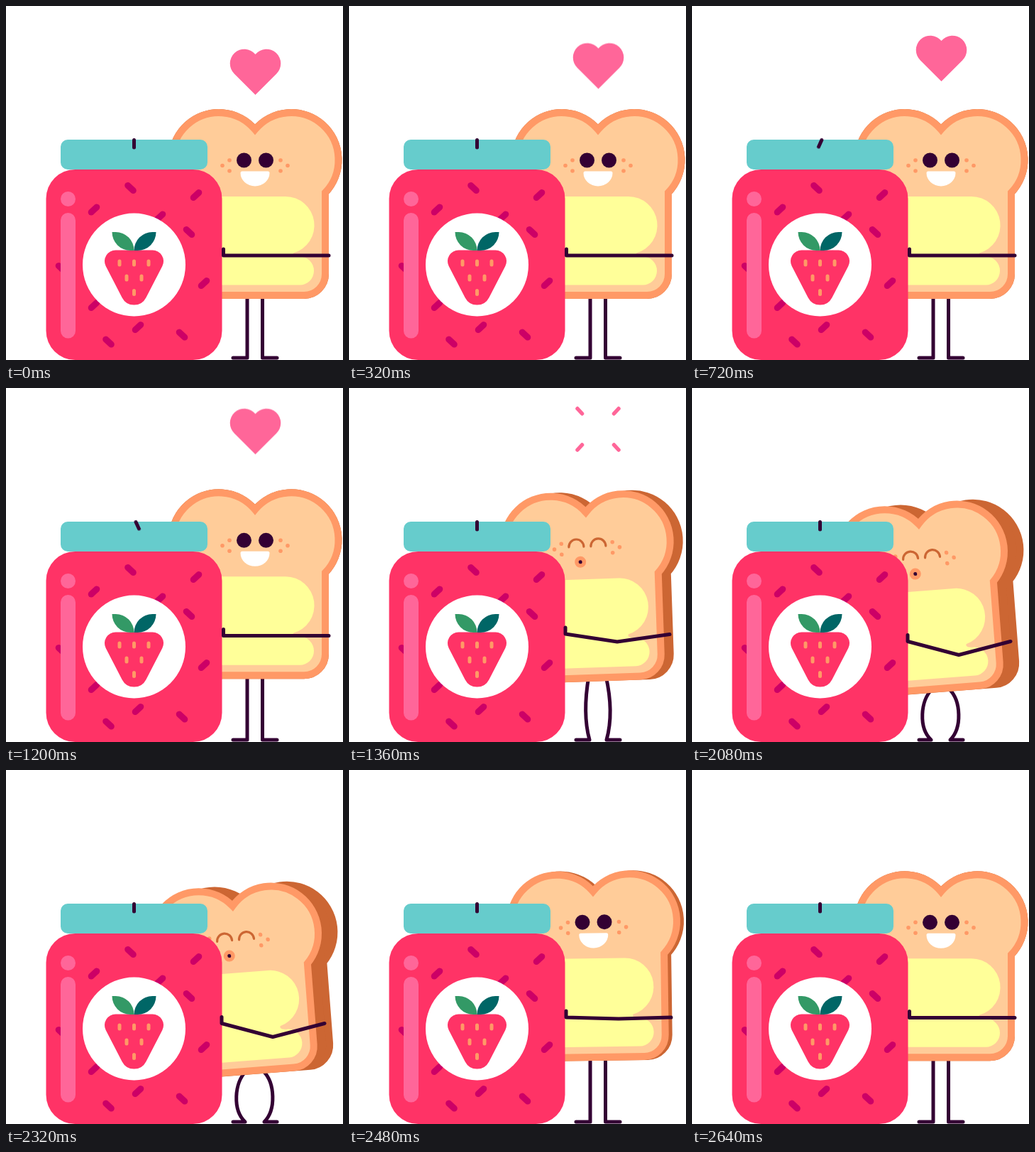
Recreate the animation shown at these times as an HTML page without scripts. Size 475 by 498 pixels, loop 2.72 s.

```html
<!DOCTYPE html>
<html lang="en">
<head>
<meta charset="utf-8">
<title>Toast hugs jam</title>
<style>
  html, body { margin: 0; width: 100%; height: 100%; overflow: hidden; background: #fff; }

  svg {
    display: block; width: 475px; height: 498px;
    --move: 0px, 0px; --tilt: 0deg; --depth: 0px;
    --awake: 1; --pout: 0px; --lips: 8px; --hole: 2.5px;
    --arm: path("M306.5 342V351L381 351L455 351");
    --left-leg: path("M320 495H340C340 470 340 440 340 390");
    --right-leg: path("M382 495H361.5C361.5 470 361.5 440 361.5 390");
    animation: pose 2720ms step-end -10ms infinite;
  }

  .line { fill: none; stroke: #303; stroke-width: 5; stroke-linecap: round; stroke-linejoin: round; }
  .left-leg { d: var(--left-leg); }
  .right-leg { d: var(--right-leg); }
  .arm { d: var(--arm); }
  .bread { transform-origin: 351px 182px; transform: translate(var(--move)) rotate(var(--tilt)); }
  .side { transform: translate(var(--depth)); }
  .awake { opacity: var(--awake); }
  .kissing { opacity: calc(1 - var(--awake)); }
  .mouth { transform: translate(var(--pout)); }
  .lips { r: var(--lips); }
  .hole { r: var(--hole); }
  .finger { transform-origin: 180.5px 188.5px; animation: wag 2720ms step-end -10ms infinite; }
  .heart { animation: rise 2720ms step-end -10ms infinite; }
  .burst { opacity: 0; stroke-dasharray: 9.6 40; animation: burst 2720ms step-end -10ms infinite; }

  @keyframes pose {
    44.118% {
      --move: 0px, -2.7px;
      --arm: path("M306.5 339.5V348.5L381 348.5L455 348.5");
    }
    47.059% {
      --move: -6px, -4px; --tilt: -0.7deg; --depth: 5px;
      --arm: path("M306 338V347L380 349L454 347");
    }
    50% {
      --move: -17px, 1px; --tilt: -2deg; --depth: 13px; --awake: 0;
      --arm: path("M305 337V346L378 357L452 346.5");
      --left-leg: path("M320 495H339C332 470 332 440 338 405");
      --right-leg: path("M382 495H363C370 470 370 440 362 405");
    }
    52.941% {
      --move: -25px, 5px; --tilt: -3deg; --depth: 17px;
      --arm: path("M304 340V348L377 363L450 348.5");
      --left-leg: path("M320 495H338C327 470 328 440 337 412");
      --right-leg: path("M382 495H364C375 470 374 440 364 412");
    }
    55.882% {
      --move: -29px, 9px; --tilt: -3.8deg; --depth: 20px; --pout: -3px; --lips: 9px; --hole: 4px;
      --arm: path("M304 342V350L376 367L449.5 350");
    }
    58.824% {
      --move: -31px, 12px; --tilt: -4.4deg; --depth: 22.5px; --pout: -7px; --lips: 10px; --hole: 5px;
      --arm: path("M304 342.5V351L376 370L449 351.5");
      --left-leg: path("M320 495H337C322 470 324 440 336 417");
      --right-leg: path("M382 495H365C378 470 377 440 366 417");
    }
    70.588% {
      --move: -31px, 14.5px; --pout: -4px; --lips: 9px; --hole: 4px;
      --arm: path("M304 345V353.5L376 373L449 354");
    }
    76.471% {
      --move: -31px, 17.5px; --pout: 0px; --lips: 8px; --hole: 2.5px;
      --arm: path("M304 347.5V356.5L376 375.5L449 356.5");
      --left-leg: path("M320 495H337C319 478 322 440 338 424");
      --right-leg: path("M382 495H364C381 478 379 440 363 424");
    }
    88.235% {
      --move: -22px, 11px; --tilt: -3deg; --depth: 16px;
      --arm: path("M304.5 344V353L378 365L451 353");
      --left-leg: path("M320 495H339C328 470 329 440 338 412");
      --right-leg: path("M382 495H363C374 470 373 440 363 412");
    }
    91.176% {
      --move: -7px, -3px; --tilt: -0.8deg; --depth: 5px; --awake: 1;
      --arm: path("M306 339V348L380 350L454 348");
      --left-leg: path("M320 495H340C340 470 340 440 340 390");
      --right-leg: path("M382 495H361.5C361.5 470 361.5 440 361.5 390");
    }
    94.118% {
      --move: 0px, -10.5px; --tilt: 0deg; --depth: 0px;
      --arm: path("M306.5 332V341L381 341L455 341");
    }
    97.059% {
      --move: 0px, -2.7px;
      --arm: path("M306.5 339.5V348.5L381 348.5L455 348.5");
    }
  }

  @keyframes wag {
    0%, 11.765%, 23.529%, 35.294%, 47.059% { transform: none; }
    2.941%, 8.824%, 26.471%, 32.353% { transform: translate(2.3px) rotate(24deg); }
    5.882%, 29.412% { transform: translate(3px) rotate(30deg); }
    14.706%, 20.588%, 38.235%, 44.118% { transform: translate(2.5px) rotate(-25deg); }
    17.647%, 41.176% { transform: translate(3px) rotate(-30deg); }
  }

  @keyframes rise {
    0% { transform: none; opacity: 1; animation-timing-function: steps(17); }
    49.999% { transform: translateY(-35.9px); opacity: 1; }
    50%, 100% { opacity: 0; }
  }

  @keyframes burst {
    50% { opacity: 1; stroke-dasharray: 9.6 40; }
    52.941% { opacity: 1; stroke-dasharray: 3 40; }
    55.882% { opacity: 0; }
  }
</style>
</head>
<body>
<svg viewBox="0 0 475 498" xmlns="http://www.w3.org/2000/svg">
  <defs>
    <path id="slice" stroke-width="10" d="M351 173.8A66.5 66.5 0 1 1 450 262.5V377a30 30 0 0 1-30 30H282a30 30 0 0 1-30-30V262.5A66.5 66.5 0 1 1 351 173.8Z"/>
    <g id="freckles">
      <circle cx="315" cy="217" r="2.8"/>
      <circle cx="305" cy="224.5" r="2.8"/>
      <circle cx="315" cy="232" r="2.8"/>
    </g>
    <path id="lid-eye" d="M325.5 222a10.5 10.5 0 0 1 21 0"/>
    <path id="rise-seed" d="M-3.8 3.6L3.8-3.6"/>
    <path id="fall-seed" d="M-3.8-3.6L3.8 3.6"/>
    <path id="leaf" d="M149.5 318H154.5A26 26 0 0 1 180.5 344H175.5A26 26 0 0 1 149.5 318Z"/>
  </defs>

  <path class="heart" fill="#f69" d="M351.5 68A20.2 20.2 0 1 0 321.9 95.4L351.5 125 381.1 95.4A20.2 20.2 0 1 0 351.5 68Z"/>
  <path class="burst" fill="none" stroke="#f69" stroke-width="5.5" stroke-linecap="round"
    d="M322 29l6.5 7M380 29l-6.5 7M322 87l6.5-7M380 87l-6.5-7"/>

  <path class="line left-leg"/>
  <path class="line right-leg"/>

  <g class="bread">
    <use class="side" href="#slice" fill="#c63" stroke="#c63"/>
    <use href="#slice" fill="#fc9" stroke="#f96"/>
    <path fill="#ff9" d="M280 268H394A40.5 40.5 0 0 1 405 347.5Q403 352.5 414 352.5a20 20 0 0 1 0 40H280Z"/>
    <g fill="#f96">
      <use href="#freckles"/>
      <use href="#freckles" transform="matrix(-1 0 0 1 702 0)"/>
    </g>
    <g class="awake">
      <circle cx="335.5" cy="217" r="10.5" fill="#303"/>
      <circle cx="366.5" cy="217" r="10.5" fill="#303"/>
      <path fill="#fff" d="M333 232.5H369Q371.5 232.5 371.5 235A20.5 18.5 0 0 1 330.5 235Q330.5 232.5 333 232.5Z"/>
    </g>
    <g class="kissing">
      <g fill="none" stroke="#c63" stroke-width="3.2" stroke-linecap="round">
        <use href="#lid-eye"/>
        <use href="#lid-eye" x="31"/>
      </g>
      <g class="mouth">
        <circle class="lips" cx="341" cy="243.5" r="8" fill="#f96"/>
        <circle class="hole" cx="341" cy="243.5" r="2.5" fill="#303"/>
      </g>
    </g>
  </g>

  <rect x="77" y="188" width="207" height="42" rx="10" fill="#6cc"/>
  <rect x="56.5" y="230" width="248" height="268" rx="41" fill="#f36"/>
  <g stroke="#c06" stroke-width="9" stroke-linecap="round">
    <use href="#fall-seed" x="175.5" y="256"/>
    <use href="#rise-seed" x="268" y="266"/>
    <use href="#rise-seed" x="124" y="286.5"/>
    <use href="#rise-seed" x="217" y="296.5"/>
    <use href="#fall-seed" x="258" y="318"/>
    <use href="#fall-seed" x="78" y="369"/>
    <use href="#rise-seed" x="279" y="390"/>
    <use href="#rise-seed" x="124" y="421"/>
    <use href="#rise-seed" x="186" y="452"/>
    <use href="#fall-seed" x="144.5" y="472.5"/>
    <use href="#fall-seed" x="248" y="462.5"/>
  </g>
  <g fill="#f69">
    <circle cx="87.5" cy="271.5" r="10.5"/>
    <rect x="77" y="291" width="21" height="176.5" rx="10.5"/>
  </g>

  <circle cx="180.5" cy="364" r="72.5" fill="#fff"/>
  <path fill="#f36" d="M154.5 343.5H206.5A15.5 15.5 0 0 1 220.3 366.1L197.4 410.3A19 19 0 0 1 163.6 410.3L140.7 366.1A15.5 15.5 0 0 1 154.5 343.5Z"/>
  <use href="#leaf" fill="#396"/>
  <use href="#leaf" fill="#066" transform="matrix(-1 0 0 1 361 0)"/>
  <path stroke="#f96" stroke-width="5" stroke-linecap="round" d="M160 359v5M180.5 359v5M201 359v5M170 380v5M191 380v5M180.5 400.5v5"/>

  <path class="line finger" d="M180.5 188.5V199"/>
  <path class="line arm"/>
</svg>
</body>
</html>
```
